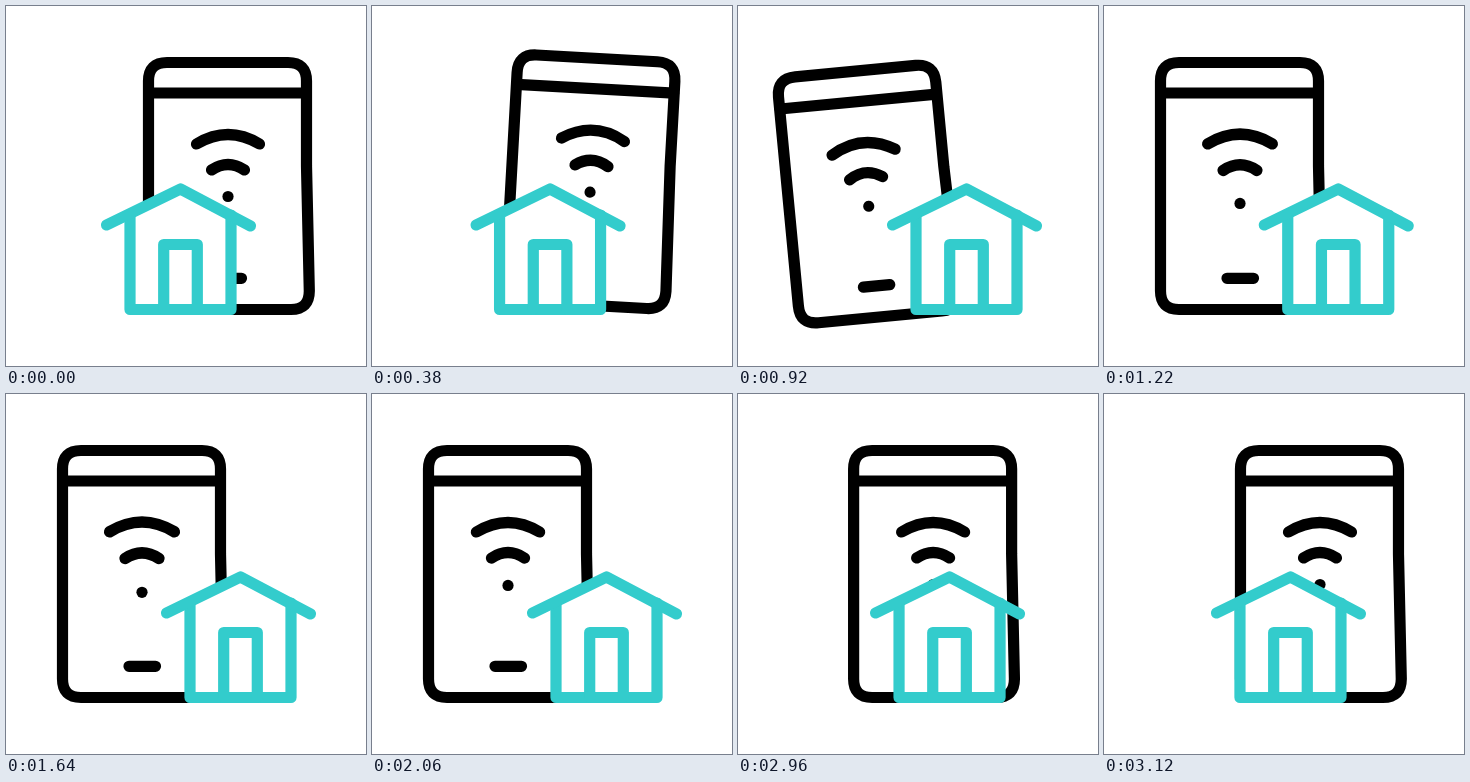
An HTML page with a canvas that plays this animation: 360 px wide and 360 px high, repeating every 3140 ms.

```html
<!DOCTYPE html>
<html lang="en">
<head>
<meta charset="utf-8">
<title>Smart home</title>
<style>
html, body { margin: 0; width: 100%; height: 100%; overflow: hidden; background: #fff; }
canvas { display: block; width: 360px; height: 360px; }
</style>
</head>
<body>
<canvas id="stage" width="360" height="360"></canvas>
<script>
const ctx = document.getElementById('stage').getContext('2d');
const LOOP = 3140, STEP = 20;
const TEAL = '#33cccc';
const PHONE_SHIFT = 86, HOUSE_SHIFT = -60;
const PIVOT = { x: 216, y: 285 };

const clamp = v => Math.max(0, Math.min(1, v));
const progress = (t, start, length) => clamp((t - start) / length);
const sineEase = p => (1 - Math.cos(Math.PI * p)) / 2;

// Symmetric cubic-bezier(a, 0, 1 - a, 1)
function strongEase(p, a) {
  let lo = 0, hi = 1;
  for (let i = 0; i < 24; i++) {
    const s = (lo + hi) / 2, r = 1 - s;
    const x = 3 * a * s * r * r + 3 * (1 - a) * s * s * r + s * s * s;
    if (x < p) lo = s; else hi = s;
  }
  return lo * lo * (3 - 2 * lo);
}

// Time in ms, tilt in degrees
const TILT = [[0, 0], [430, 3.3], [900, -5.5], [1190, 0]];

function tiltAt(t) {
  for (let i = 1; i < TILT.length; i++) {
    const [t0, v0] = TILT[i - 1], [t1, v1] = TILT[i];
    if (t < t1) return v0 + (v1 - v0) * sineEase((t - t0) / (t1 - t0));
  }
  return 0;
}

function phoneOffset(t) {
  const away = strongEase(progress(t, 0, 1170), 0.75);
  const back = strongEase(progress(t, 2428, 994), 0.85);
  return PHONE_SHIFT * (1 - away + back);
}

function houseOffset(t) {
  const away = strongEase(progress(t, 50, 1271), 0.75);
  const back = strongEase(progress(t, 2404, 1185), 0.75);
  return HOUSE_SHIFT * (1 - away + back);
}

const signalPulse = t => Math.sin(Math.PI * progress(t, 700, 1520)) ** 2;

function stroke(path) {
  ctx.stroke(new Path2D(path));
}

function drawSignal(pulse) {
  ctx.save();
  ctx.translate(136, 146);
  ctx.scale(1 + 0.03 * pulse, 1 + 0.03 * pulse);
  stroke('M-31.5 -8 Q0 -27 31.5 -8 M-16.5 18 Q0 7 16.5 18');
  ctx.restore();

  ctx.beginPath();
  ctx.arc(136, 190.5 + 9 * pulse, 5.6, 0, Math.PI * 2);
  ctx.fill();
}

function drawPhone(t) {
  ctx.save();
  ctx.translate(PIVOT.x + phoneOffset(t), PIVOT.y);
  ctx.rotate(tiltAt(t) * Math.PI / 180);
  ctx.translate(-PIVOT.x, -PIVOT.y);
  ctx.strokeStyle = ctx.fillStyle = '#000';
  stroke('M75 56.5 H196 Q214.5 56.5 214.5 75 V160 L217.3 285 ' +
         'Q217.3 303.5 199 303.5 H75 Q56.5 303.5 56.5 285 V75 Q56.5 56.5 75 56.5 Z');
  stroke('M57 87 H214 M123 272.3 H149.5');
  drawSignal(signalPulse(t));
  ctx.restore();
}

function drawHouse(t) {
  ctx.save();
  ctx.translate(234.5 + houseOffset(t), 0);
  ctx.fillStyle = '#fff';
  ctx.strokeStyle = TEAL;
  ctx.fill(new Path2D('M-50.5 303.5 V208 L0 183 L50.5 208 V303.5 Z'));
  stroke('M-50.5 209 V303.5 H50.5 V209');
  stroke('M-16.8 303 V238.5 H16.8 V303');
  stroke('M-74 219 L0 183 L70 220');
  ctx.restore();
}

function draw(t) {
  ctx.fillStyle = '#fff';
  ctx.fillRect(0, 0, 360, 360);
  ctx.lineWidth = 11.2;
  ctx.lineCap = ctx.lineJoin = 'round';
  drawPhone(t);
  drawHouse(t);
}

const startTime = performance.now();

function tick() {
  const t = (performance.now() - startTime) % LOOP;
  draw(Math.floor(t / STEP) * STEP);
  requestAnimationFrame(tick);
}
tick();
</script>
</body>
</html>
```
